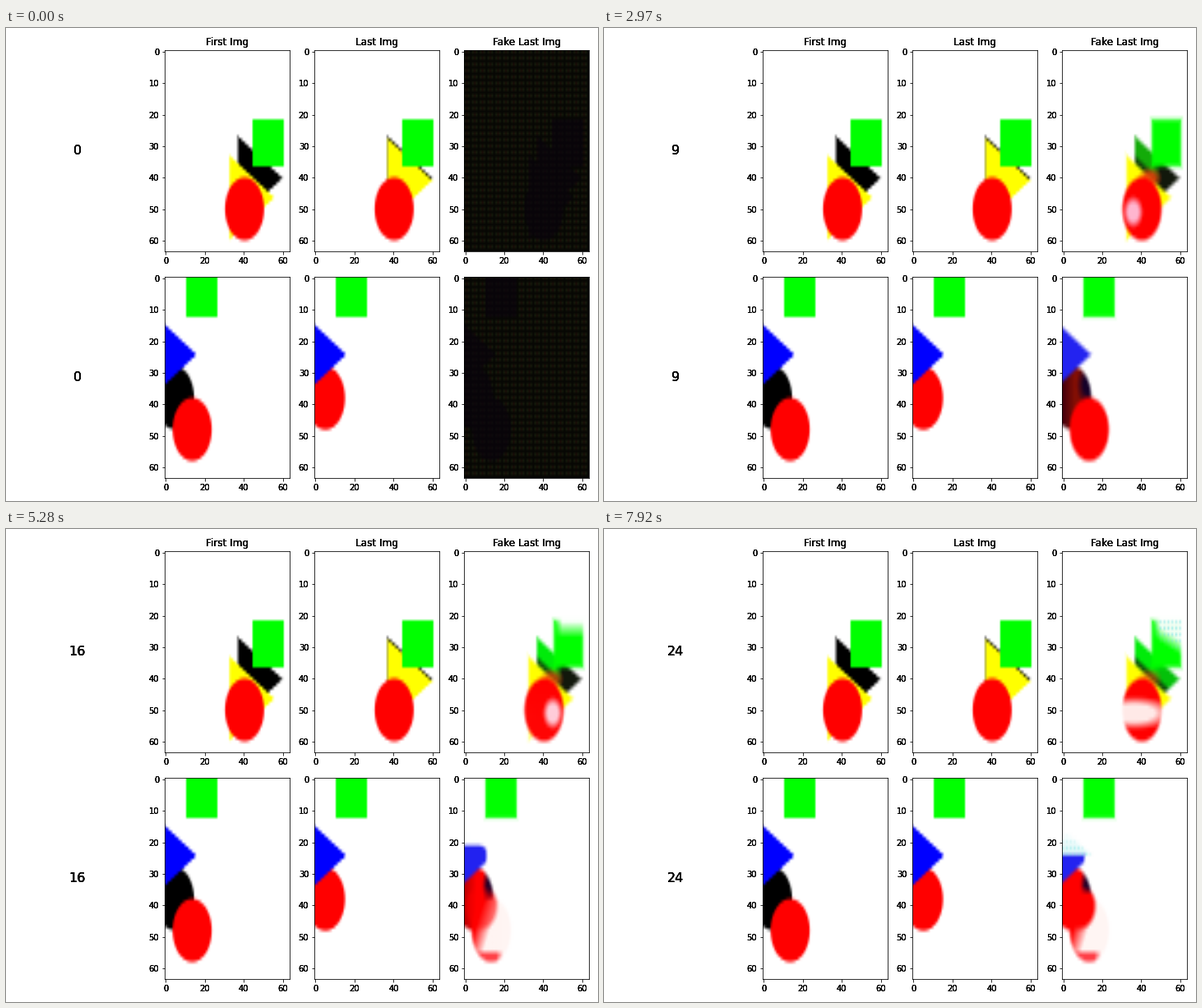
Write a matplotlib script that moves like this. It is 720 px wide and 576 px high and loops after 8 s.

```python
import numpy as np
import matplotlib.pyplot as plt
from matplotlib.animation import FuncAnimation

W, H, N = 720, 576, 64
STEP, LOOP, TICK = 330, 8000, 80
Y, X = np.mgrid[:N, :N].astype(float)
DOTS = ((X % 2 == 0) & (Y % 2 == 0)).astype(float)

WHITE, BLACK = (255, 255, 255), (0, 0, 0)
RED, GREEN, BLUE, YELLOW = (255, 0, 0), (0, 255, 0), (0, 0, 255), (255, 255, 0)
ORANGE, CYAN, NAVY, BROWN = (255, 105, 40), (110, 225, 225), (10, 0, 45), (62, 22, 6)
DUSK, BLUSH, PALE = (18, 24, 12), (255, 190, 218), (255, 245, 243)


# ---- masks and mixing on the 64 x 64 grid ----
def ramp(v, a, b):
    return np.clip((v - a) / (b - a), 0, 1)


def ease(e, a, b):
    t = ramp(e, a, b)
    return t * t * (3 - 2 * t)


def mix(a, b, t):
    return np.asarray(a) * (1 - t) + np.asarray(b) * t


def edge(d, soft):
    return np.clip(0.5 + d / soft, 0, 1)


def disc(cx, cy, soft=1.0, r=10):
    return edge(r - np.hypot(X - cx, Y - cy), soft)


def box(x0, x1, y0, y1, soft=0.1):
    inside = np.minimum.reduce([X - x0, x1 - X, Y - y0, y1 - Y])
    return edge(inside + 0.5, soft)


def tri(tx, ty, soft=0.8):
    """Triangle pointing right, with its tip at (tx, ty)."""
    slope = ((tx - X) * 0.585 - np.abs(Y - ty)) * 0.86
    return edge(np.minimum(slope, X - (tx - 22.8)), soft)


def blob(cx, cy, rx, ry, soft=0.7):
    q = np.hypot((X - cx) / rx, (Y - cy) / ry)
    return edge(1 - q, soft)


def paint(base, *layers):
    """Lay (mask, colour) pairs over a base; a colour may itself be a picture."""
    a = np.ones((N, N, 3)) * base
    for mask, col in layers:
        a += (np.asarray(col, float) - a) * mask[..., None]
    return a


# ---- the crisp pictures ----
SQ1, SQ2 = box(45, 60, 22, 36), box(11, 26, -9, 12)
BALL1, BALL2 = disc(40.4, 50), disc(13.6, 48.1)
WEDGE1, WEDGE2 = tri(59.8, 40.2), tri(15.8, 24.4)

FIRST = [
    paint(WHITE, (WEDGE1, BLACK), (tri(55.6, 46.4), YELLOW), (BALL1, RED), (SQ1, GREEN)),
    paint(WHITE, (disc(4.5, 38), BLACK), (WEDGE2, BLUE), (BALL2, RED), (SQ2, GREEN)),
]
LAST = [
    paint(WHITE, (WEDGE1, BLACK), (tri(59.8, 40.9), YELLOW), (BALL1, RED), (SQ1, GREEN)),
    paint(WHITE, (disc(5.2, 38.2), RED), (WEDGE2, BLUE), (SQ2, GREEN)),
]

# ---- the generated pictures, as functions of the epoch ----
BLUR = 1.6
K1, T1 = tri(59.6, 40.2, BLUR), tri(55.4, 46.4, BLUR)
G1, R1 = box(46, 60, 22, 36, BLUR), disc(40.5, 50, BLUR)
SEAM = ramp(np.abs(Y - 32.4 - 0.585 * (X - 33)), 2.5, 0.5)
K2, B2 = disc(4.5, 38, BLUR), tri(14.4, 24.4, BLUR)
G2, R2 = box(11, 26, -9, 12, 1.2), disc(13.5, 48.1, BLUR)


def wash(e):
    """Short spell in which fading areas break up into dots."""
    return np.exp(-((e - 13) / 1.5) ** 2)


def noise(row):
    shape = 1 - FIRST[row].min(axis=2) / 255
    grid = paint((7, 7, 4), (DOTS, (22, 28, 12)), ((X % 4 == 1) * DOTS[:, :1], (26, 12, 8)))
    return paint(grid, (shape * 0.65, (8, 2, 12)))


def fake_top(e):
    dots, late = wash(e), ease(e, 9, 24)
    speck = max(dots, ease(e, 20, 24))

    slope = 0.4 * ease(e, 20, 24)
    gone = ease(e, 9, 13) * ramp(Y - slope * (X - 46), 27, 22) * ramp(X, 46, 50)
    square = paint(GREEN, (gone * 0.95, WHITE), (gone * DOTS * speck * 0.6, CYAN))

    dusk = ramp(X, 46, 50) * (1 - 0.8 * ease(e, 20, 24))
    wedge = paint(mix(BROWN, (0, 235, 10), ease(e, 2, 13)),
                  (dusk, mix(BROWN, DUSK, ease(e, 2, 9))),
                  (SEAM * 0.7 * ease(e, 2, 9), DUSK))
    yellow = paint(YELLOW, (late * ramp(Y, 49, 53), WHITE))
    bleed = blob(44.5, 40.2, 4.5, 2.6, 0.9) * (0.85 - 0.35 * late)

    # a pale gap sways across the ball, then widens into a band
    cx = 40.5 + 4.5 * np.sin(0.45 * (e - 12.5))
    gap = ease(e, 4, 9) * blob(cx, 51, 4 + 12 * ease(e, 16, 20), 4)
    melt = dots * ramp(Y, 40, 53)
    ball = paint(RED, (gap * 0.95, mix(BLUSH, PALE, late)),
                 (melt, (255, 246, 225)), (melt * DOTS * 0.75, ORANGE),
                 (melt * ramp(X, 37, 31) * 0.7, (255, 215, 50)))
    return paint(WHITE, (K1, wedge), (T1, yellow), (bleed, (235, 65, 10)),
                 (R1, ball), (G1, square))


def fake_bottom(e):
    dots, turn = wash(e), ease(e, 5, 15)
    speck = max(dots, ease(e, 20, 24))

    cut = 13 + 9 * ease(e, 9, 13) + 3 * ease(e, 20, 24)
    above = ramp(Y, cut, cut - 1.5)
    side = ramp(X, 10, 12) * ease(e, 13, 16)
    blue = paint(mix(BLUE, (35, 35, 240), ease(e, 2, 9) - dots), (np.maximum(above, side), WHITE),
                 (above * ramp(Y, cut - 8, cut) * speck * (0.3 + 0.5 * DOTS), mix(CYAN, (140, 165, 255), dots)))

    back = paint(mix(BROWN, RED, turn),
                 (ramp(X, 6, 0) * (1 - ease(e, 13, 18)), (70, 0, 12)),
                 (blob(13, 34, 5 - 2 * turn, 5, 0.9) * 0.9, NAVY))

    # the lower ball empties from its right side
    empty = ease(e, 9, 13) * ramp(X + 0.5 * Y, 29, 37)
    rim = ramp(Y, 54, 56) * ramp(X, 20, 16) * ease(e, 9, 13)
    ball = paint(RED, (empty, PALE),
                 (empty * DOTS * dots * ramp(X, 21, 13) * 0.75, ORANGE),
                 (rim * 0.85, mix((255, 30, 40), (255, 235, 80), dots)))
    bulge = blob(8.5, 40.5, 8, 7, 0.3) * (1 - B2) * ease(e, 13, 19) * ramp(Y, 34, 37)
    return paint(WHITE, (K2, back), (B2, blue), (R2, ball), (bulge, RED), (G2, GREEN))


def rgb(a):
    return np.clip(np.round(a), 0, 255).astype(np.uint8)


FAKES = [[rgb(noise(0)), rgb(noise(1))]]
FAKES += [[rgb(fake_top(e)), rgb(fake_bottom(e))] for e in range(1, 25)]

# ---- figure ----
fig = plt.figure(figsize=(W / 72, H / 72), dpi=72, facecolor="white")
LEFTS, TOPS, AW, AH = (193.2, 375.3, 557.4), (27.2, 303.2), 151.8, 245


def ink(x, y, s, size, ha="center", va="baseline"):
    """Text laid down several times for a heavy, dark edge."""
    return [fig.text(x / W, 1 - y / H, s, fontsize=size, ha=ha, va=va,
                     color="black", family="DejaVu Sans") for _ in range(4)]


def panel(x, y, data):
    ax = fig.add_axes([x / W, 1 - (y + AH) / H, AW / W, AH / H])
    im = ax.imshow(data, aspect="auto", interpolation="bilinear")
    ax.set_xticks(range(0, 61, 20))
    ax.set_yticks(range(0, 61, 10))
    ax.tick_params(labelleft=False, labelbottom=False)
    for v in range(0, 61, 10):
        ink(x - 7, y + (v + 0.5) * AH / N, str(v), 10, "right", "center_baseline")
        if v % 20 == 0:
            ink(x + (v + 0.5) * AW / N, y + AH + 7, str(v), 10, va="top")
    return im


for x, name in zip(LEFTS, ("First Img", "Last Img", "Fake Last Img")):
    ink(x + AW / 2, TOPS[0] - 6, name, 12)

views, counters = [], []
for row, y in enumerate(TOPS):
    panel(LEFTS[0], y, rgb(FIRST[row]))
    panel(LEFTS[1], y, rgb(LAST[row]))
    views.append(panel(LEFTS[2], y, FAKES[0][row]))
    counters += ink(86.7, y + AH / 2, "0", 16, va="center")


def update(i):
    epoch = min((i * TICK + TICK - 1) // STEP, 24)
    for view, data in zip(views, FAKES[epoch]):
        view.set_data(data)
    for t in counters:
        t.set_text(str(epoch))
    return views + counters


anim = FuncAnimation(fig, update, frames=LOOP // TICK, interval=TICK,
                     repeat=True, repeat_delay=0, blit=False)
plt.show()
```
